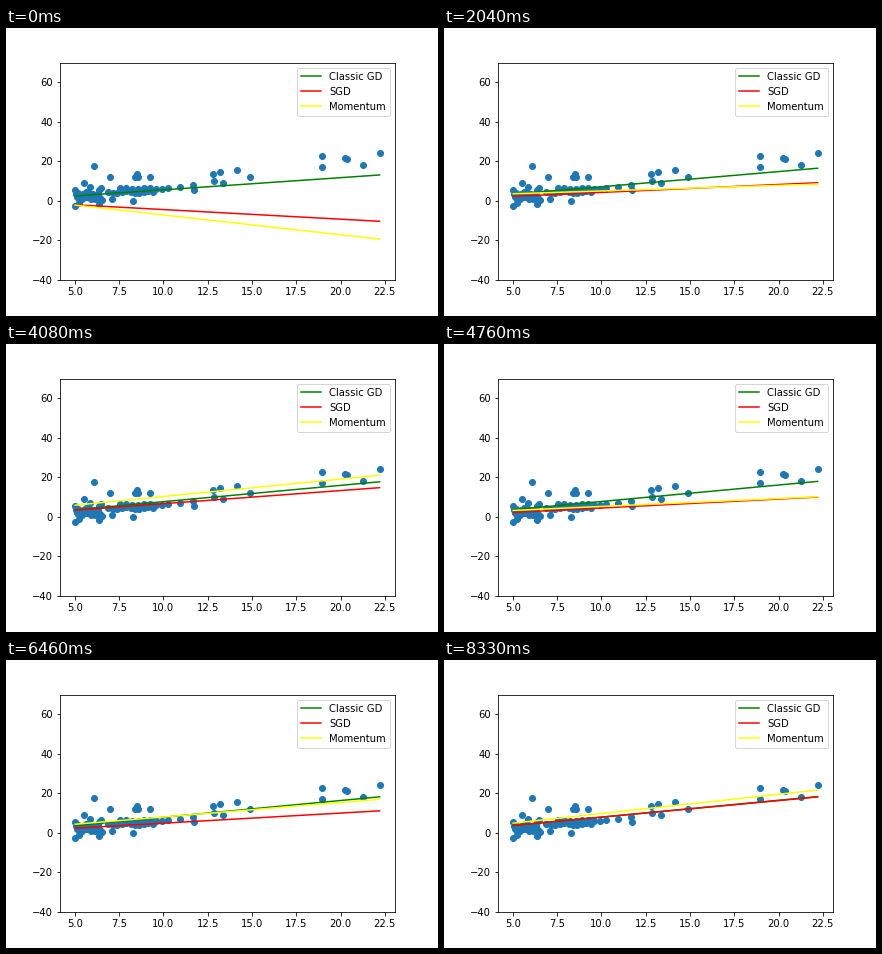
Animation of 432 by 288 pixels, one loop 8670 ms. Source, as a matplotlib script:

```python
import matplotlib.pyplot as plt
import numpy as np
from matplotlib.animation import FuncAnimation

STEPS, STEP_MS = 51, 170
X0, X1 = 5.0269, 22.203

# Points that stand clear of the crowd
outliers = [
    (6.11, 17.59), (5.53, 9.13), (5.87, 7.0), (7.0032, 11.854), (8.38, 11.89),
    (8.52, 13.66), (8.58, 12.0), (9.25, 12.13), (12.83, 13.5), (13.18, 14.69),
    (12.84, 10.12), (13.39, 9.06), (14.16, 15.5), (14.91, 12.05),
    (18.95, 22.64), (18.96, 17.05), (20.27, 21.77), (20.34, 20.99),
    (21.28, 17.93), (22.2, 24.15), (10.96, 7.05), (11.7, 8.0), (11.71, 5.39),
    (8.29, 0.14), (7.09, 1.05), (6.36, -1.42), (6.55, 0.3), (5.03, -2.68),
    (5.04, 5.7), (5.25, -1.22), (5.64, 4.6), (6.35, 5.4), (6.5, 6.5),
]


def crowd():
    """Dense block at low x, then two thinner rows running right."""
    rng = np.random.default_rng(4)
    bx = np.linspace(5.08, 6.4, 30)
    by = rng.uniform(0.5, 3.9, bx.size)
    upper = np.linspace(7.55, 10.25, 9)
    lower = np.linspace(6.9, 9.4, 11)
    x = np.concatenate([bx, upper, lower])
    y = np.concatenate([by, 6.4 + 0.4 * np.sin(5 * upper),
                        4.4 + 0.6 * np.sin(5 * lower)])
    return np.column_stack([x, y])


def ends(bias, end):
    return [bias + (end - bias) * X0 / X1, end]


def ease_keys(keys, k):
    """Cosine swing between successive (step, value) turning points."""
    steps, values = zip(*keys)
    pos = np.interp(k, steps, range(len(steps)))
    i = int(pos)
    u = (1 - np.cos(np.pi * (pos - i))) / 2
    return np.interp(i + u, range(len(values)), values)


def classic(k):
    bias, slope = -0.53, 0.856 - 0.241 * 0.9185 ** k
    return ends(bias, bias + slope * X1)


def sgd(k):
    # One far sample throws the fit upwards near step 41
    keys = [(0, -10.3), (4, 11.8), (12, 9.2), (24, 14.8), (33, 4.1),
            (40, 14), (41, 64), (42, 55.6), (43, 13.6), (49, 18.2)]
    return ends(0.5 - 0.018 * k, np.interp(k, *zip(*keys)))


def momentum(k):
    swings = [(0, -19.3), (4.7, 42), (16.8, -8.8), (21, 32),
              (27, 10.2), (33, 10.3), (43, 23.8), (49, 21.7)]
    return ends(2.9 - 0.058 * k, ease_keys(swings, k))


fig, ax = plt.subplots(figsize=(6, 4), dpi=72)
fig.subplots_adjust(left=0.125, right=0.9, bottom=0.125, top=0.88)
ax.scatter(*np.vstack([outliers, crowd()]).T)

fits = []
for name, color, fit in [("Classic GD", "green", classic),
                         ("SGD", "red", sgd),
                         ("Momentum", "yellow", momentum)]:
    line, = ax.plot([X0, X1], fit(0), color=color, label=name)
    fits.append((line, fit))

margin = 0.05 * (X1 - X0)
ax.set_xlim(X0 - margin, X1 + margin)
ax.set_ylim(-40, 70)
ax.legend(loc="upper right")


def update(i):
    k = min(i, STEPS - 2)  # the last fit is held for two steps
    for line, fit in fits:
        line.set_ydata(fit(k))
    return [line for line, _ in fits]


anim = FuncAnimation(fig, update, frames=STEPS, interval=STEP_MS, repeat=True,
                     repeat_delay=0, blit=False)
plt.show()
```
